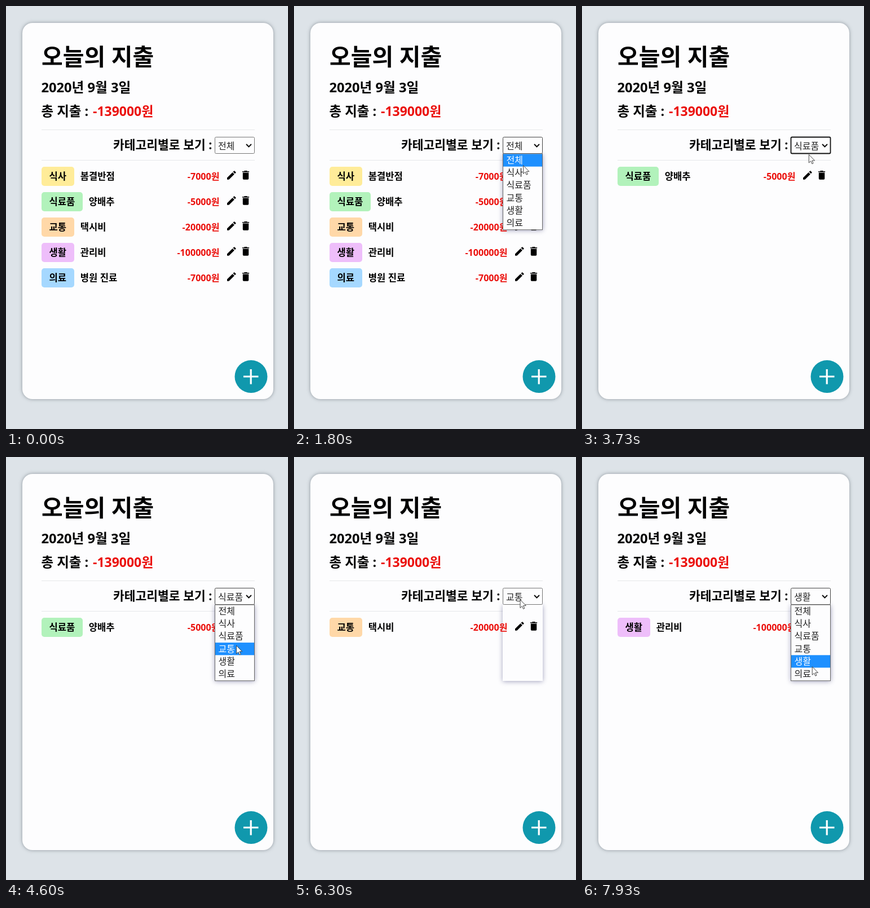
Animation of 500x750 px, one loop 8 s. Source, as an HTML page:

```html
<!DOCTYPE html>
<html lang="ko">
<head>
<meta charset="utf-8">
<style>
  html, body { margin: 0; width: 100%; height: 100%; overflow: hidden; background: #dde3e8; }
  svg { display: block; width: 500px; height: 750px; }
  text { font: bold 16.6px "Open Sans", "Noto Sans CJK KR", "Noto Sans CJK JP", sans-serif; white-space: pre; }
  .red { fill: #eb100c; }
  .end { text-anchor: end; }
  .option { font-weight: 400; font-size: 16px; fill: #222; }
  .card { filter: drop-shadow(0 0 3px rgba(60, 70, 80, .5)); }
  .shadow { filter: drop-shadow(0 1px 4px rgba(50, 50, 110, .45)); }
</style>
</head>
<body>
<svg viewBox="0 0 500 750">
  <defs>
    <g id="icons">
      <path transform="translate(389.4 289.6) scale(.87)" d="M3 17.25V21h3.75L17.81 9.94l-3.75-3.75zM20.71 7.04a1 1 0 0 0 0-1.41l-2.34-2.34a1 1 0 0 0-1.41 0l-1.83 1.83 3.75 3.75z"/>
      <path transform="translate(414.6 289.4) scale(.87)" d="M6 19a2 2 0 0 0 2 2h8a2 2 0 0 0 2-2V7H6zM19 4h-3.5l-1-1h-5l-1 1H5v2h14z"/>
    </g>
  </defs>

  <rect class="card" x="29" y="30" width="445" height="667" rx="18" fill="#fdfdfe"/>
  <text x="63" y="105" style="font-size:41px">오늘의 지출</text>
  <text x="62.5" y="153" style="font-size:23.7px">2020년 9월 3일</text>
  <text x="62.5" y="195" style="font-size:23.5px">총 지출 :</text>
  <text x="154" y="195" class="red" style="font-size:23px">-139000원</text>
  <path d="M63 219.5H441M63 273.5H441" stroke="#e6e8ea"/>
  <text x="365.5" y="253.5" class="end" style="font-size:21.5px">카테고리별로 보기 :</text>

  <rect id="shadow" class="shadow" x="370" y="262" width="71" height="135" fill="#fdfdfe"/>
  <g id="list"></g>

  <rect id="box" x="370.5" y="232.5" width="70" height="29" rx="2" fill="#fdfdfe"/>
  <text id="value" class="option" x="376" y="254"></text>
  <path d="M426 245l4.5 4.5 4.5-4.5" fill="none" stroke="#111" stroke-width="2"/>

  <g id="panel">
    <rect x="370.5" y="262" width="70" height="134.7" fill="#fdfdfe" stroke="#666"/>
    <rect id="mark" x="371" width="69" height="22.2" fill="#1e90ff"/>
    <g id="options"></g>
  </g>

  <circle cx="434.5" cy="657" r="29" fill="#1098ad"/>
  <path d="M421 657H447.5M434.2 644V670.5" stroke="#fff" stroke-width="3.2"/>
  <path id="cursor" d="M0 0V14.6L3.4 11.4 5.6 16.4 7.8 15.4 5.6 10.6H10.3Z" fill="#fff" stroke="#333" stroke-width=".9"/>
</svg>

<script>
const LOOP = 8000, TOP = 262.5, ROW = 22.2, BLANK = 50;
const ENTRY = [520, 420], HOME = [401, 253];
const $ = id => document.getElementById(id);

// The menu opens at "open"; the entry is chosen at "pick"
const items = [
  { kind: '식사', name: '봄결반점', cost: 7000, color: '#ffec99', open: 1620, pick: 2200 },
  { kind: '식료품', name: '양배추', cost: 5000, color: '#b2f2bb', open: 2700, pick: 3530 },
  { kind: '교통', name: '택시비', cost: 20000, color: '#ffd8a8', open: 4255, pick: 5030 },
  { kind: '생활', name: '관리비', cost: 100000, color: '#eebefa', open: 6270, pick: 7000 },
  { kind: '의료', name: '병원 진료', cost: 7000, color: '#a5d8ff', open: 7625, pick: LOOP }
];
const names = ['전체', ...items.map(item => item.kind)];

// The pointer goes to each option in turn and back to the select box
const moves = [[900, HOME]];
items.forEach(({ open, pick }, i) =>
  moves.push([open + BLANK, [409, TOP + ROW * (i + 1.5)]], [pick, HOME]));

function add(parent, markup) {
  $(parent).insertAdjacentHTML('beforeend', markup);
  return $(parent).lastChild;
}

const rows = items.map(({ kind, name, cost, color }) => {
  const width = kind.length > 2 ? 73 : 58;
  return add('list', `<g>
    <rect x="63" y="285" width="${width}" height="34" rx="5" fill="${color}"/>
    <text x="76.5" y="308">${kind}</text>
    <text x="${63 + width + 10.8}" y="308">${name}</text>
    <text x="378.5" y="308" class="red end" style="font-size:16.1px">-${cost}원</text>
    <use href="#icons"/></g>`);
});

const options = names.map((name, i) =>
  add('options', `<text class="option" x="376.5" y="${279 + i * ROW}">${name}</text>`));

const show = (el, on) => el.style.display = on ? '' : 'none';
const glide = ms => 1 - Math.exp(-Math.max(0, ms) / 110);

const pointer = t => moves.reduce((from, [start, to]) =>
  from.map((v, i) => v + (to[i] - v) * glide(t - start)), ENTRY);

function draw(now) {
  const t = now % LOOP;
  const [x, y] = pointer(t);
  const chosen = items.filter(item => t >= item.pick).length;
  const current = items.find(item => t >= item.open && t < item.pick);
  const filled = current && t >= current.open + BLANK;
  const focused = chosen && !current;

  rows.forEach((row, i) => {
    show(row, !chosen || chosen === i + 1);
    row.setAttribute('transform', `translate(0 ${chosen ? 0 : i * 45})`);
  });

  $('value').textContent = names[chosen];
  $('box').setAttribute('stroke', focused ? '#111' : filled ? '#444' : '#767676');
  $('box').setAttribute('stroke-width', focused ? 1.8 : 1);

  const hover = y < TOP ? chosen : Math.floor((y - TOP) / ROW);
  $('mark').setAttribute('y', TOP + hover * ROW);
  options.forEach((option, i) => option.style.fill = i === hover ? '#fff' : '');
  show($('shadow'), current);
  show($('panel'), filled);

  $('cursor').setAttribute('transform', `translate(${x} ${y})`);
  requestAnimationFrame(draw);
}
requestAnimationFrame(draw);
</script>
</body>
</html>
```
